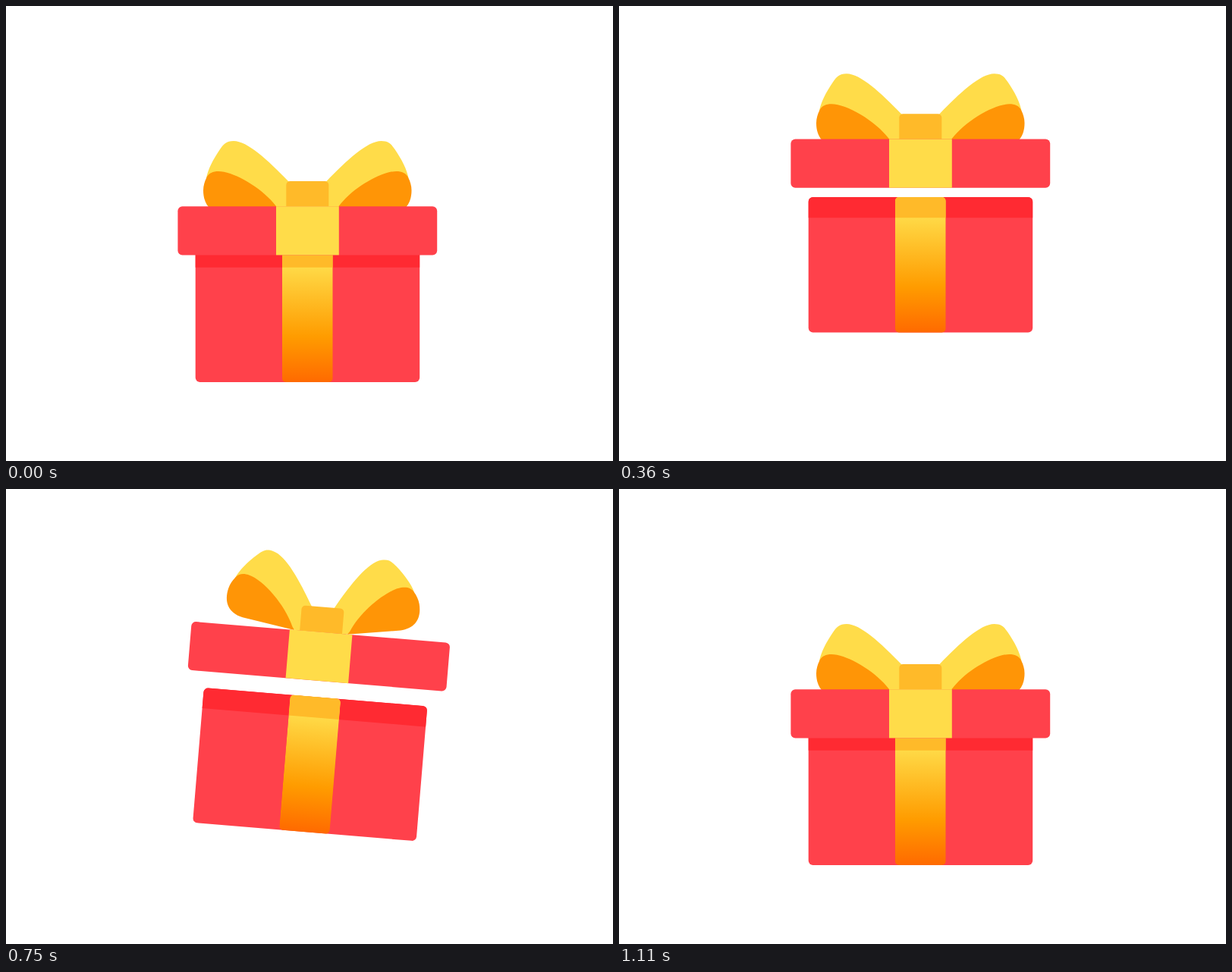
Animation of 800x600 px, one loop 1.41 s. Source, as an HTML page:

```html
<!DOCTYPE html>
<html lang="en">
<head>
<meta charset="utf-8">
<title>Gift box</title>
<style>
  html, body { margin: 0; width: 100%; height: 100%; overflow: hidden; background: #fff; }
  svg { display: block; width: 100vw; height: 100vh; }
</style>
</head>
<body>
<svg viewBox="0 0 800 600">
  <defs>
    <linearGradient id="ribbon" gradientUnits="userSpaceOnUse" x1="0" y1="345" x2="0" y2="496">
      <stop offset="0" stop-color="#ffd946"/>
      <stop offset=".6" stop-color="#ff9c00"/>
      <stop offset="1" stop-color="#ff6a00"/>
    </linearGradient>
    <clipPath id="bodyClip"><rect x="249.7" y="317.5" width="295.5" height="178.5" rx="6"/></clipPath>
    <clipPath id="ribbonClip"><rect x="364" y="317.5" width="66.5" height="178.5" rx="5"/></clipPath>
    <g id="loop">
      <path fill="#ffdc49" d="M385 272V245L372 231C345 203 318 178 300 178C290 178 287 182 282 189C273 202 266 216 264 227L300 268L362 267Z"/>
      <path fill="#ff9506" d="M264 227C267 220 273 218 280 218C300 218 338 240 356 264L360 267.5L290 273.5C270 274 260 262 260 243C260 237 262 231 264 227Z"/>
    </g>
  </defs>
  <g id="gift">
    <g clip-path="url(#bodyClip)">
      <path fill="#ff414b" d="M249 317h297v180H249z"/>
      <path fill="#ff2a32" d="M249 317h297v27.7H249z"/>
    </g>
    <g clip-path="url(#ribbonClip)">
      <path fill="url(#ribbon)" d="M364 317h67v180H364z"/>
      <path fill="#ffba29" d="M364 317h67v27.7H364z"/>
    </g>
    <g id="lid">
      <use id="left" href="#loop"/>
      <g transform="translate(794.5) scale(-1 1)"><use id="right" href="#loop"/></g>
      <rect x="369.3" y="231" width="56" height="40" rx="5" fill="#ffba29"/>
      <rect x="226.4" y="264.2" width="341.8" height="64.2" rx="6" fill="#ff414b"/>
      <rect x="356" y="264.2" width="82.8" height="64.2" fill="#ffdc49"/>
    </g>
  </g>
</svg>
<script>
const STEP = 30, LOOP = 1410, LAST = 37;

// Eased 0 to 1 between two steps, along cubic-bezier(p, 0, q, 1)
function ease(k, from, to, p = 1 / 3, q = p) {
  const u = Math.min(1, Math.max(0, (k - from) / (to - from)));
  let lo = 0, hi = 1;
  for (let i = 0; i < 24; i++) {
    const s = (lo + hi) / 2, r = 1 - s;
    if (3 * p * r * r * s + 3 * q * r * s * s + s ** 3 < u) lo = s; else hi = s;
  }
  return lo * lo * (3 - 2 * lo);
}

const place = (id, value) => document.getElementById(id).setAttribute('transform', value);

function draw(now) {
  const k = Math.min(LAST, Math.floor(now % LOOP / STEP));
  const rise = 77.5 * (ease(k, 0, 19, .58, .3) - ease(k, 19, 36, .3, .4));
  const gap = 33.7 * (ease(k, 6, 19, .4, .25) - ease(k, 24, 32, .4));
  const tilt = 5 * (ease(k, 12, 29) - ease(k, 29, 36));
  const perk = 20 * (ease(k, 18, 29, 1 / 3, 2 / 3) - ease(k, 29, 37, 1 / 3, 2 / 3));

  place('gift', `translate(0 ${-rise}) rotate(${tilt} 397.4 446)`);
  place('lid', `translate(0 ${-gap})`);
  for (const id of ['left', 'right']) place(id, `rotate(${perk} 374 275)`);
  requestAnimationFrame(draw);
}
draw(0);
</script>
</body>
</html>
```
